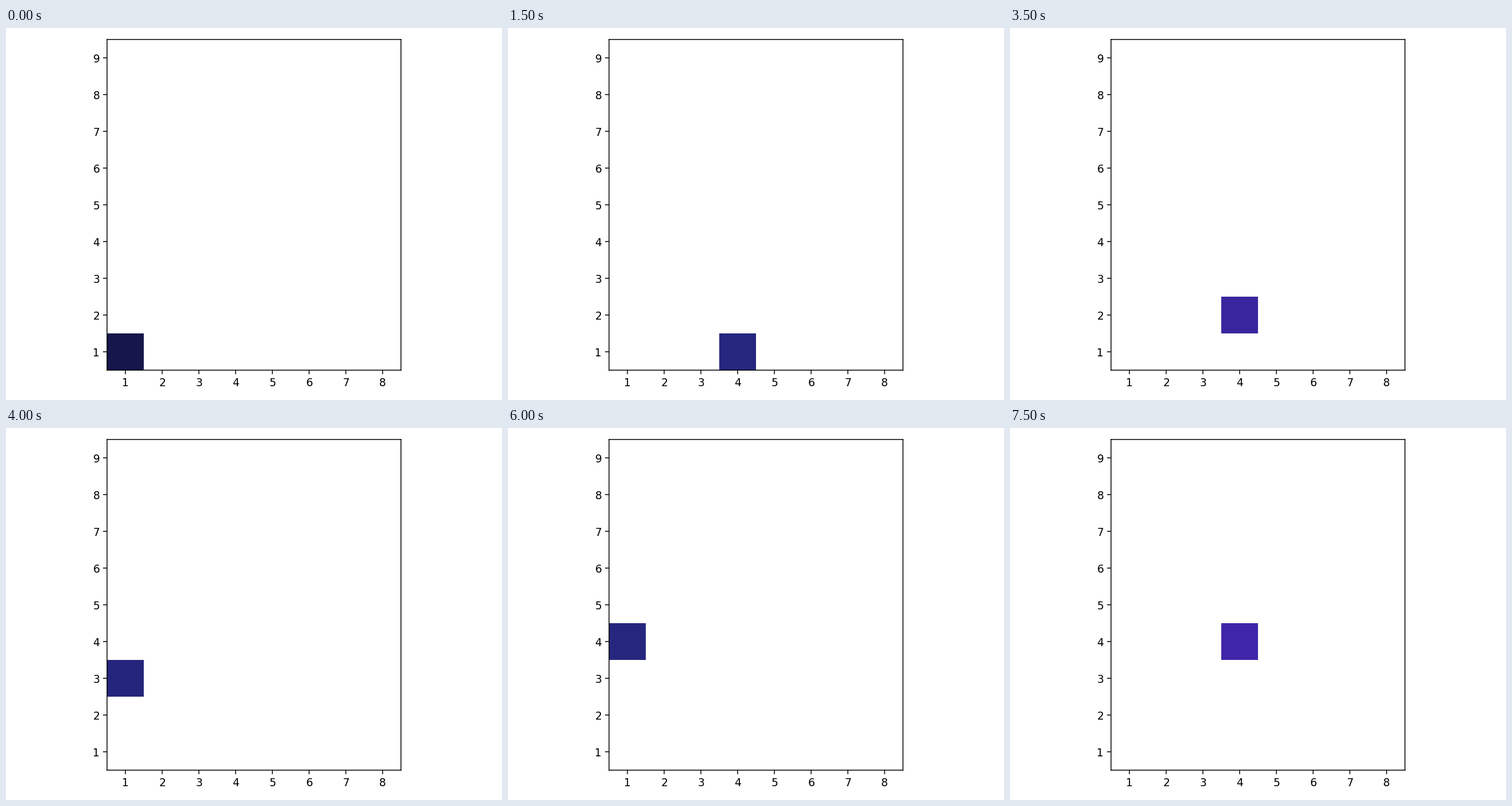
These frames come from a looping animation (864 px wide and 648 px high, 8 s). A matplotlib script:

```python
import matplotlib.pyplot as plt
import numpy as np
from matplotlib.animation import FuncAnimation

WIDTH, HEIGHT, DPI = 864, 648, 135
COLS, ROWS = 8, 9
SIDE = 4  # the scan covers a SIDE x SIDE corner of the grid
LEFT, BOTTOM, CELL = 176.4, 52, 63.97


def falloff(k):
    """Levels rise quickly away from the border, then saturate."""
    return 0.46 * (1 - 0.4 * 0.25 ** k)


def grid(step):
    row, col = divmod(step, SIDE)
    cells = np.full((ROWS, COLS), np.nan)
    cells[row, col] = falloff(row) * falloff(col)
    return np.ma.masked_invalid(cells)


fig = plt.figure(figsize=(WIDTH / DPI, HEIGHT / DPI), dpi=DPI, facecolor="white")
ax = fig.add_axes([LEFT / WIDTH, BOTTOM / HEIGHT,
                   COLS * CELL / WIDTH, ROWS * CELL / HEIGHT])
image = ax.imshow(grid(0), cmap="CMRmap", vmin=0, vmax=1, origin="lower",
                  interpolation="nearest", aspect="auto",
                  extent=(0.5, COLS + 0.5, 0.5, ROWS + 0.5))
ax.set_xticks(range(1, COLS + 1))
ax.set_yticks(range(1, ROWS + 1))


def update(step):
    image.set_data(grid(step))
    return [image]


anim = FuncAnimation(fig, update, frames=SIDE * SIDE, interval=500,
                     repeat=True, repeat_delay=0)
plt.show()
```
